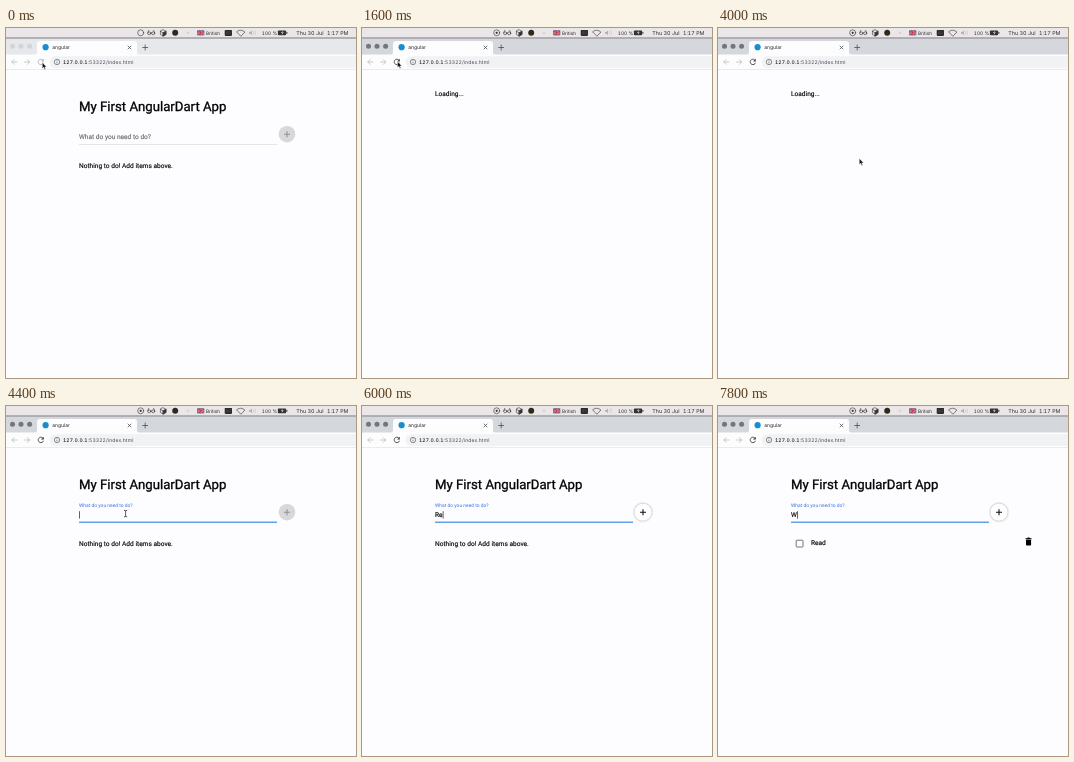
Animation, 350 px wide and 350 px high, one loop 8 s. Source, as an HTML page:

```html
<!DOCTYPE html>
<html lang="en">
<head>
<meta charset="utf-8">
<title>To-do app demo</title>
<style>
  html, body { margin: 0; width: 100%; height: 100%; overflow: hidden; background: #fdfcfe; }
  svg { display: block; width: 100%; height: 100%; }
  text { text-rendering: geometricPrecision; white-space: pre; }
  .chrome { font: 5px Inter, sans-serif; fill: #2a2a2c; font-variant-numeric: tabular-nums; }
  .page { font: 6.59px Roboto, sans-serif; fill: #000; stroke: #000; stroke-width: .14; }
  .line { fill: none; stroke-linecap: round; stroke-linejoin: round; }
  .hidden { visibility: hidden; }
  #strip { fill: #d4d7dc; }
  #lights { fill: #747679; }
  #reload { stroke: #3c3e42; fill: none; }
  #reload path + path { fill: #3c3e42; stroke: none; }
  .inactive #strip { fill: #e6e8eb; }
  .inactive #lights { fill: #d2d4d8; }
  .inactive #reload { opacity: .4; }
  .inactive.hover #reload { opacity: .7; }
  .inactive #dot { visibility: hidden; }
  #label { fill: #6a6a6a; stroke: #6a6a6a; }
  .focused #label { fill: #3674e4; stroke: none; font-size: 4.93px; }
  #underline { fill: #dcdcde; }
  .focused #underline { fill: #3d8ae2; }
  #disc { fill: #d8d7d9; }
  #plus { stroke: #929194; }
  .ready #disc { fill: #fff; filter: drop-shadow(0 .8px .9px #0006); }
  .ready #plus { stroke: #111; }
</style>
</head>
<body>
<svg id="stage" viewBox="0 0 350 350">
  <rect width="350" height="350" fill="#fdfcfe"/>

  <!-- menu bar -->
  <rect width="350" height="10" fill="#ebe6e8"/>
  <g class="line" stroke="#333" stroke-width=".6">
    <circle cx="134.7" cy="4.8" r="3"/>
    <circle id="dot" cx="134.7" cy="4.8" r="1.1" fill="#333" stroke="none"/>
    <circle cx="143.2" cy="5.3" r="1.5"/><circle cx="147.2" cy="5.3" r="1.5"/>
    <path d="M141.7 5l1-2.6M148.7 5l-1-2.6M144.7 5h1"/>
    <path d="M157.2 1.8l2.8 1.5v3.2l-2.8 1.5-2.8-1.5V3.3zM154.4 3.3l2.8 1.5 2.8-1.5M157.2 4.8V8"/>
    <path d="M157.2 4.8l2.8-1.5v3.2L157.2 8z" fill="#333"/>
    <path d="M234.6 8l-4-4.2q4-3.2 8 0z"/>
  </g>
  <circle cx="169.2" cy="4.8" r="3" fill="#2c2a1c"/>
  <circle cx="182" cy="4.8" r="1.4" fill="#d8d3d5"/>
  <rect x="191.2" y="2.3" width="7" height="5" fill="#35407a"/>
  <path d="M191.2 2.300l7 5M198.200 2.300l-7 5" stroke="#d9b9c4" stroke-width=".6"/>
  <path d="M194.700 2.300v5M191.200 4.800h7" stroke="#eed5da" stroke-width="1.500"/>
  <path d="M194.700 2.300v5M191.200 4.800h7" stroke="#c92c3c" stroke-width="1"/>
  <rect x="218.700" y="1.900" width="7.300" height="6" rx=".8" fill="#2c2c2e"/>
  <path d="M220 4h5M220 5.800h5" stroke="#999" stroke-width=".4" stroke-dasharray=".6 .7"/>
  <path d="M243 4h1.300l1.700-1.500v4.800L244.300 5.800H243z" fill="#b5b0b2"/>
  <path class="line" d="M247.300 3.500q1 1.300 0 2.600M249 2.700q1.700 2.100 0 4.200" stroke="#bdb8ba" stroke-width=".5"/>
  <rect x="271.900" y="2.500" width="8.200" height="4.800" rx=".8" fill="#333"/>
  <path d="M280.900 4v1.800" stroke="#333"/>
  <path d="M276.800 2.800l-1.800 2.300h1.400l-.7 1.900 2-2.500h-1.500z" fill="#eee"/>
  <g class="chrome">
    <text x="200" y="6.600" font-size="4.700">British</text>
    <text x="255.800" y="6.700" font-size="4.800">100 %</text>
    <text x="290.300" y="6.800" font-size="5.400">Thu 30 Jul</text>
    <text x="321" y="6.800" font-size="5.300">1:17 PM</text>
  </g>

  <!-- browser frame -->
  <rect id="strip" y="10" width="350" height="17"/>
  <rect y="9.200" width="350" height="1.600" fill="#a5a4a8"/>
  <g id="lights">
    <circle cx="6.500" cy="18.200" r="2.500"/><circle cx="15" cy="18.200" r="2.500"/><circle cx="23.600" cy="18.200" r="2.500"/>
  </g>
  <path d="M28 27q3 0 3-3v-8q0-3 3-3h94q3 0 3 3v8q0 3 3 3z" fill="#fdfdfe"/>
  <circle cx="39.600" cy="19.200" r="3.100" fill="#168fd2"/>
  <text class="chrome" x="46.200" y="21.300" font-size="5">angular</text>
  <path class="line" d="M122 18l3 3m0-3l-3 3M136.700 19.500h5m-2.500-2.500v5" stroke="#4c4e52" stroke-width=".8"/>
  <rect y="26.500" width="350" height="15" fill="#fdfdfe"/>
  <rect y="41" width="350" height=".6" fill="#e0e0e3"/>
  <rect x="43.500" y="28.300" width="320" height="11.600" rx="5.800" fill="#f1f2f4"/>
  <path class="line" d="M11 34H5.800m2.400-2.400L5.800 34l2.400 2.400M18.500 34h5.200m-2.400-2.400l2.400 2.400-2.400 2.400" stroke="#b9bbc0" stroke-width=".8"/>
  <g id="reload">
    <path d="M36.800 32a2.700 2.700 0 1 0 .7 2.700" stroke-width=".9"/>
    <path d="M37.800 30.800v2.800H35z"/>
  </g>
  <circle cx="51" cy="34" r="2.700" fill="none" stroke="#606266" stroke-width=".7"/>
  <path d="M51 33.700v1.700M51 32.300v.7" stroke="#606266" stroke-width=".7"/>
  <text class="chrome" x="57" y="36.200" font-size="5.750" letter-spacing=".13"><tspan fill="#1c1c1e" font-weight="500">127.0.0.1</tspan><tspan fill="#48494d">:53322/index.html</tspan></text>

  <!-- page -->
  <text id="loading" class="page" x="73" y="68">Loading...</text>
  <g id="app" class="page">
    <text x="73" y="82.700" font-size="13.200" stroke-width=".3">My First AngularDart App</text>
    <text id="label" x="73" y="111">What do you need to do?</text>
    <text id="typed" x="73" y="111.200"></text>
    <rect id="caret" y="105.200" width=".7" height="7.400" fill="#222" stroke="none"/>
    <rect id="underline" x="73" y="116" width="198" height=".7" stroke="none"/>
    <g stroke="none"><circle id="disc" cx="281" cy="106.200" r="8.300"/></g>
    <path id="plus" d="M278 106.200h6M281 103.200v6" stroke-width="1.100"/>
    <text id="empty" x="73" y="140.200">Nothing to do! Add items above.</text>
    <g id="item">
      <rect x="78.200" y="134.200" width="6.800" height="6.800" rx=".6" fill="none" stroke="#666" stroke-width=".9"/>
      <text x="93" y="139.300">Read</text>
      <path d="M307.500 132.200h1.700l.5-.6h1.700l.5.6h1.700v1h-6.100zM308 133.700h5.100v5q0 .8-.8.800h-3.500q-.8 0-.8-.8z" stroke="none"/>
    </g>
  </g>

  <!-- pointers -->
  <path id="arrow" d="M0 0v6l1.400-1.300 1 2.300 1-.5-1-2.200h1.900z" fill="#111" stroke="#fff" stroke-width=".4"/>
  <path id="beam" class="line" d="M-1.200-3.200q1.200 0 1.200.7 0-.7 1.200-.7M0-2.500v5M-1.200 3.200q1.200 0 1.200-.7 0 .7 1.200.7" stroke="#222" stroke-width=".7"/>
</svg>
<script>
const LOOP = 8000, STEP = 200;
const CLICK = 1400, LOADED = 4200, FOCUS = 4400, ADDED = 7000;
const typing = [[5800, 'R'], [6000, 'Re'], [6200, 'Rea'], [6400, 'Read'], [ADDED, ''], [7600, 'W']];
const pointer = [[0, 36.3, 34.6], [1600, 35.5, 33.6], [2600, 35.5, 33.6],
  [3600, 141.3, 130.6], [4000, 141.3, 130.6], [FOCUS, 119.6, 107.6], [LOOP, 119.6, 107.6]];

const $ = id => document.getElementById(id);
const show = (id, on) => $(id).classList.toggle('hidden', !on);
const ease = p => p * p * (3 - 2 * p);

function pointerAt(t) {
  const i = pointer.findIndex(([end]) => end > t);
  const [t0, x0, y0] = pointer[i - 1], [t1, x1, y1] = pointer[i];
  const p = ease((t - t0) / (t1 - t0));
  return [x0 + (x1 - x0) * p, y0 + (y1 - y0) * p];
}

function render(t) {
  const key = typing.filter(([at]) => at <= t).pop();
  const value = key ? key[1] : '';
  const loading = t >= CLICK && t < LOADED;
  const focused = t >= FOCUS;
  const flags = {
    inactive: t < CLICK,
    hover: t >= 800,
    focused,
    ready: value !== ''
  };
  for (const name in flags) $('stage').classList.toggle(name, flags[name]);

  $('loading').style.display = loading ? '' : 'none';
  $('app').style.display = loading ? 'none' : '';
  show('empty', t < ADDED);
  show('item', t >= ADDED);

  $('label').setAttribute('y', focused ? 100.8 : 111);
  $('underline').setAttribute('height', focused ? 1.2 : .7);
  $('underline').setAttribute('y', focused ? 115.6 : 116.1);
  $('disc').setAttribute('r', value ? 8.6 : 8.3);
  $('typed').textContent = value;
  const width = value && !loading ? $('typed').getComputedTextLength() : 0;
  $('caret').setAttribute('x', 73.2 + width);
  // The caret restarts its blink at focus and at each key press.
  const since = t - (key ? key[0] : FOCUS);
  show('caret', focused && since % 1000 < 500);

  const [x, y] = pointerAt(t);
  for (const id of ['arrow', 'beam']) $(id).setAttribute('transform', `translate(${x} ${y})`);
  show('arrow', !focused);
  show('beam', focused && !key);
}

let start = null, last = -1;
function tick(now) {
  start ??= now;
  const t = Math.floor((now - start) % LOOP / STEP) * STEP;
  if (t !== last) render(last = t);
  requestAnimationFrame(tick);
}
render(0);
requestAnimationFrame(tick);
</script>
</body>
</html>
```
